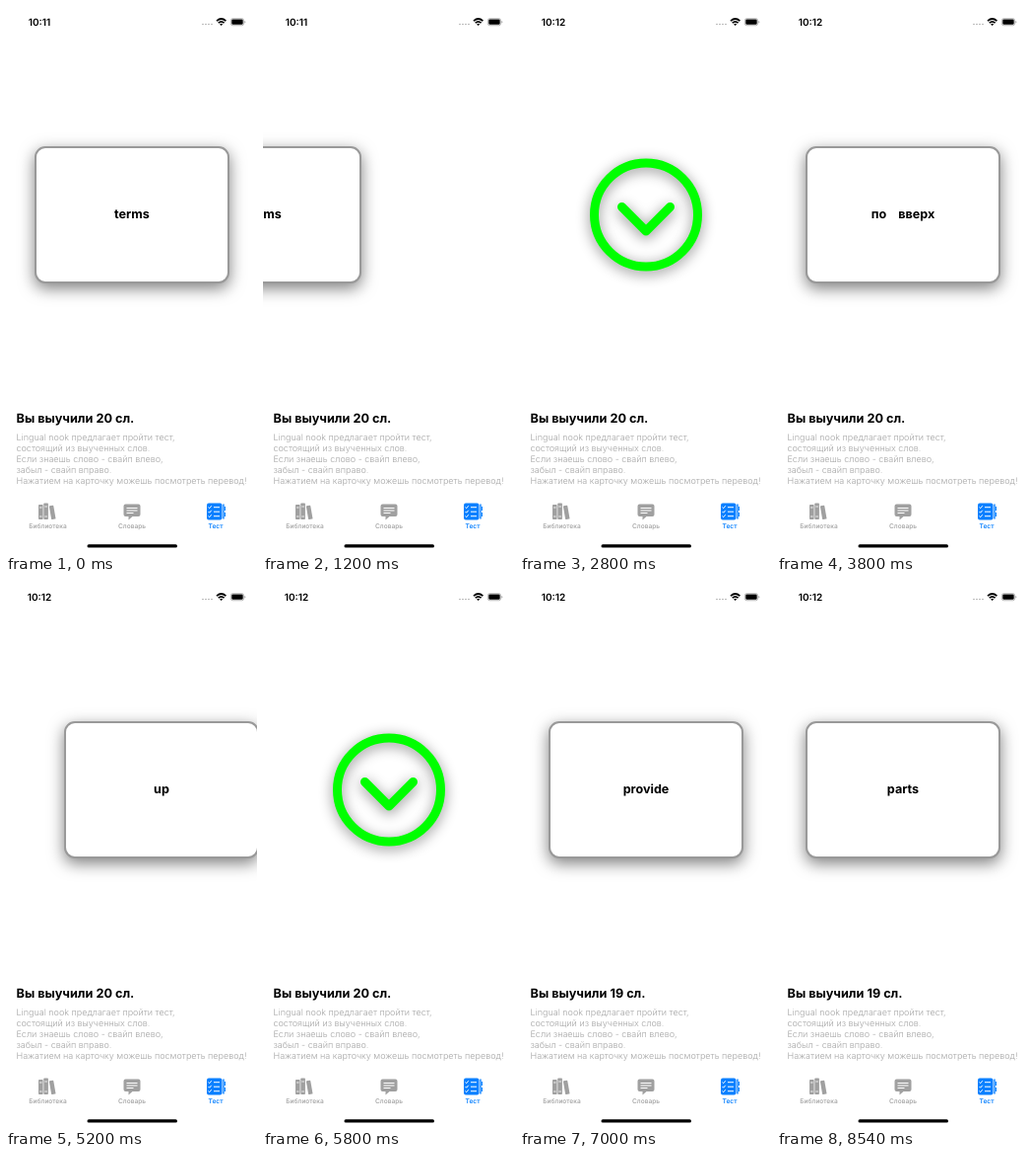
Animation, 255 px wide and 554 px high, one loop 8.87 s. Source, as an HTML page:

```html
<!DOCTYPE html>
<html lang="ru">
<head>
<meta charset="utf-8">
<title>Тест</title>
<style>
  html, body { margin: 0; width: 100%; height: 100%; overflow: hidden; background: #fff; }
  #stage { position: relative; width: 255px; height: 554px; overflow: hidden; background: #fff;
    font-family: Inter, "Liberation Sans", sans-serif; text-rendering: geometricPrecision; }
  svg { position: absolute; left: 0; top: 0; }
  #card { position: absolute; left: 29px; top: 142px; width: 198px; height: 139px;
    box-sizing: border-box; border: 2px solid #999; border-radius: 11px; background: #fff;
    box-shadow: 0 5px 16px rgba(0, 0, 0, .5);
    font-size: 12.6px; font-weight: 700; line-height: 135px;
    text-align: center; white-space: pre; }
  .mark { fill: none; stroke-width: 9; stroke-linecap: round; stroke-linejoin: round;
    filter: drop-shadow(0 3px 7px rgba(0, 0, 0, .45)); }
  #yes { stroke: #0f0; }
  #no { stroke: #f00; }
  #clock { font-size: 10px; font-weight: 600; text-anchor: middle; }
  #count { font-size: 12.7px; font-weight: 700; }
  .note { font-size: 9px; font-weight: 300; fill: #a6a6a6; }
  .tabs { font-size: 6.6px; font-weight: 500; text-anchor: middle; fill: #a0a0a0; }
  .tabs .on { fill: #0a80ff; }
</style>
</head>
<body>
<div id="stage">
  <svg width="255" height="554" viewBox="0 0 255 554">
    <text id="clock" x="34" y="20">10:11</text>
    <g fill="#aaa">
      <circle cx="200" cy="18.5" r=".8"/><circle cx="203" cy="18.5" r=".8"/>
      <circle cx="206" cy="18.5" r=".8"/><circle cx="209" cy="18.5" r=".8"/>
    </g>
    <g fill="none" stroke="#000" stroke-width="1.7">
      <path d="M214 15.2Q218.7 10.8 223.4 15.2"/>
      <path d="M215.8 17.2Q218.7 14.5 221.6 17.2"/>
    </g>
    <path d="M217.2 18.4Q218.7 17.2 220.2 18.4L218.7 20Z"/>
    <rect x="228.4" y="12.7" width="13.2" height="7" rx="2" fill="none" stroke="#999" stroke-width=".7"/>
    <rect x="229.3" y="13.6" width="11.4" height="5.2" rx="1.2"/>
    <path d="M242.4 15v2.4q1-.3 1-1.2t-1-1.2" fill="#999"/>

    <text id="count" x="10.5" y="421.5">Вы выучили 20 сл.</text>
    <g class="note">
      <text x="10.5" y="440">Lingual nook предлагает пройти тест,</text>
      <text x="10.5" y="451">состоящий из выученных слов.</text>
      <text x="10.5" y="462">Если знаешь слово - свайп влево,</text>
      <text x="10.5" y="473">забыл - свайп вправо.</text>
      <text x="10.5" y="484">Нажатием на карточку можешь посмотреть перевод!</text>
    </g>

    <g class="tabs">
      <rect x="33" y="505" width="4.6" height="15" rx=".8"/>
      <rect x="38.3" y="503.5" width="4.6" height="16.500" rx=".8"/>
      <rect x="45" y="506" width="4.4" height="14" rx=".8" transform="rotate(-10 47 513)"/>
      <path d="M34 508h2.6M34 517h2.6M39.3 507h2.6M39.3 517h2.6" stroke="#fff" stroke-width=".8"/>
      <path d="M121.5 504.5h13q2 0 2 2v8.5q0 2-2 2h-6l-4 3.5v-3.5h-3q-2 0-2-2v-8.5q0-2 2-2z"/>
      <path d="M122.5 508.500h11M122.5 511h11M122.5 513.5h7" stroke="#fff"/>
      <rect class="on" x="204" y="503.5" width="15.5" height="17" rx="2"/>
      <path class="on" d="M220.3 504.5h1.4v15h-1.4zM222 507h1v4h-1zM222 513h1v4h-1z"/>
      <path d="M205.5 507.5l1.2 1.2 2-2.4M205.5 512l1.2 1.2 2-2.4M205.5 516.5l1.2 1.2 2-2.4M211 507.7h6M211 512.2h6M211 516.7h6"
        fill="none" stroke="#fff"/>
      <text x="42.5" y="529">Библиотека</text>
      <text x="128" y="529">Словарь</text>
      <text class="on" x="213" y="529" font-weight="600">Тест</text>
    </g>
    <rect x="82.5" y="545.3" width="91.5" height="3.2" rx="1.6"/>
  </svg>

  <div id="card">terms</div>

  <svg width="255" height="554" viewBox="0 0 255 554">
    <g id="yes" class="mark" opacity="0">
      <circle cx="128" cy="211.5" r="52.5"/>
      <path d="M103.5 203.5L128 228L152.5 203.5"/>
    </g>
    <g id="no" class="mark" opacity="0">
      <circle cx="128" cy="211.5" r="52.5"/>
      <path d="M109 192.5l38 38M147 192.5l-38 38"/>
    </g>
  </svg>
</div>
<script>
  const LOOP = 8870;
  const el = id => document.getElementById(id);

  // Each pose holds until the next one starts.
  const poses = [
    { at: 0, word: 'terms' },
    { at: 1200, word: 'terms', x: -127 },
    { at: 1400, word: 'terms', x: -205, yes: .6 },
    { at: 1600, yes: 1 },
    { at: 1800, word: 'use' },
    { at: 2600, word: 'use', x: -130 },
    { at: 2800, yes: 1 },
    { at: 3000, word: 'up', x: 60 },
    { at: 3200, word: 'up' },
    { at: 3600, word: 'up', turn: 55 },
    { at: 3800, word: 'по    вверх' },
    { at: 4600, word: 'по    вверх', turn: 55 },
    { at: 4800, word: 'up' },
    { at: 5200, word: 'up', x: 30 },
    { at: 5400, word: 'up', x: -8 },
    { at: 5600, yes: .6 },
    { at: 5800, yes: 1 },
    { at: 6000, word: 'need' },
    { at: 6400, word: 'need', x: 4 },
    { at: 6600, no: .8 },
    { at: 6800, no: 1 },
    { at: 7000, word: 'provide' },
    { at: 8200, yes: 1 },
    { at: 8540, word: 'parts' }
  ];

  const card = el('card');
  let shown;

  function draw(t) {
    const pose = poses.findLast(p => p.at <= t);
    if (pose === shown) return;
    shown = pose;
    const { at, word = '', x = 0, turn = 0, yes = 0, no = 0 } = pose;
    card.style.visibility = word ? 'visible' : 'hidden';
    card.textContent = word;
    card.style.transform = turn ? `perspective(900px) rotateY(${turn}deg)` : `translateX(${x}px)`;
    el('yes').setAttribute('opacity', yes);
    el('no').setAttribute('opacity', no);
    el('clock').textContent = at < 1600 ? '10:11' : '10:12';
    el('count').textContent = `Вы выучили ${at < 7000 ? 20 : 19} сл.`;
  }

  function tick() {
    draw(performance.now() % LOOP);
    requestAnimationFrame(tick);
  }
  tick();
</script>
</body>
</html>
```
